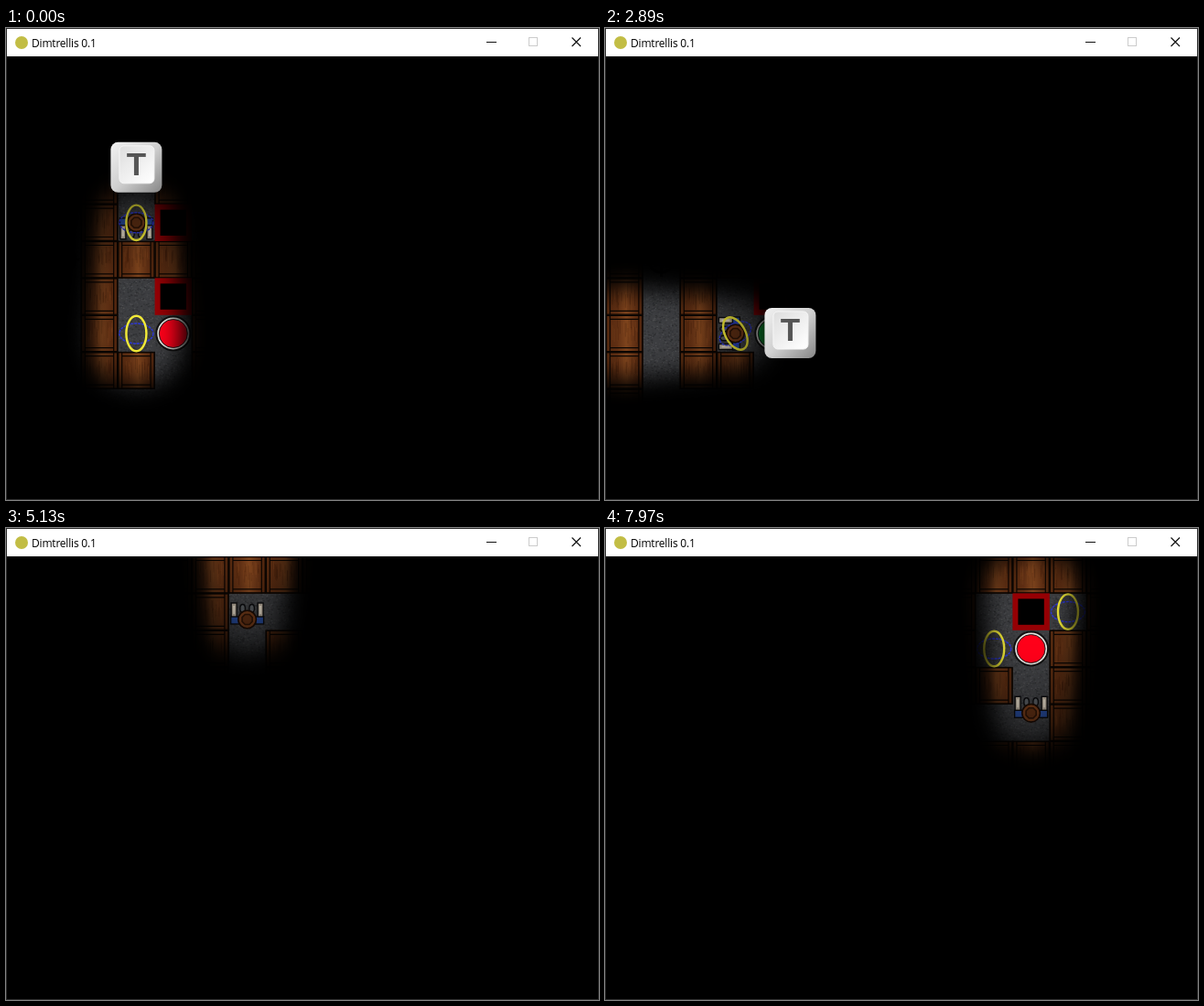
Recreate the animation shown at these times as an HTML page with a canvas. Size 648 px wide and 516 px high, loop 8000 ms.

```html
<!DOCTYPE html>
<html lang="en">
<head>
<meta charset="utf-8">
<title>Dimtrellis 0.1</title>
<style>
  html, body { margin: 0; width: 100%; height: 100%; overflow: hidden; background: #000; }
  #win { position: absolute; left: 0; top: 0; width: 648px; height: 516px; background: #000; }
  #win::after { content: ""; position: absolute; inset: 0; border: 1px solid #2c2c2c; }
  #bar { position: absolute; left: 1px; top: 1px; width: 646px; height: 30px; background: #fff; }
  #icon { position: absolute; left: 9px; top: 8px; width: 14px; height: 14px; border-radius: 50%; background: #c2bd45; }
  #name { position: absolute; left: 27px; top: 0; font: 12px/31px "Open Sans", "Noto Sans", sans-serif; letter-spacing: -.2px; color: #000; white-space: nowrap; }
  #bar svg { position: absolute; left: 0; top: 0; }
  canvas { position: absolute; left: 1px; top: 31px; }
</style>
</head>
<body>
<div id="win">
  <div id="bar">
    <div id="icon"></div>
    <div id="name">Dimtrellis 0.1</div>
    <svg width="646" height="30" fill="none">
      <path d="M524 14.5h11" stroke="#111"/>
      <rect x="570.5" y="9.5" width="9" height="9" stroke="#ccc"/>
      <path d="M617.5 9.5l9.5 9.5m0-9.5l-9.5 9.5" stroke="#111" stroke-width="1.2"/>
    </svg>
  </div>
  <canvas id="game" width="646" height="484"></canvas>
</div>
<script>
const LOOP = 8000, W = 646, H = 484, T = 40.4;
const MAP = [
  '################',
  '#.####...#...###',
  '#.####.#.#..####',
  '#.#.##.#.##.####',
  '#.#....#....####',
  '#.##############',
  '#.#..###..######',
  '#.#..###########',
  '#.##.###########',
  '#....###########',
  '################',
  '################'
];
const mid = n => (n + .5) * T;
const ANGLE = { U: 0, R: Math.PI / 2, D: Math.PI, L: -Math.PI / 2 };

// time, column, row, facing; a repeated time is a jump
const WALK = [
  [0, 3, 4, 'D'], [720, 3, 4, 'D'], [720, 3, 7, 'D'],
  [1160, 3, 7, 'R'], [1470, 4, 7, 'R'],
  [1790, 4, 7, 'L'], [2100, 3, 7, 'L'],
  [2950, 3, 7, 'L'], [2950, 3, 4, 'L'],
  [3635, 3, 4, 'R'], [4405, 6, 4, 'U'],
  [5185, 6, 1, 'U'], [5230, 6, 1, 'R'], [5800, 8, 1, 'R'],
  [6370, 8, 1, 'R'], [6370, 8, 1.22, 'D'], [6980, 8, 4, 'R'],
  [7710, 11, 4, 'R'], [7890, 11, 4, 'U'], [7970, 11, 3.74, 'U'], [8000, 11, 3.74, 'U']
];
const SPINS = [[300, 1070], [2350, 3635]];

let seed = 7;
const rnd = () => (seed = (seed * 16807) % 2147483647) / 2147483647;

function layer(w, h) {
  const c = document.createElement('canvas');
  c.width = w; c.height = h;
  return c.getContext('2d');
}

function ring(g, x, y, rx, ry, color, width, fill) {
  g.beginPath();
  g.ellipse(x, y, rx, ry, 0, 0, 7);
  if (fill) { g.fillStyle = fill; g.fill(); }
  if (width) { g.strokeStyle = color; g.lineWidth = width; g.stroke(); }
}

function box(g, x, y, w, h, color) {
  g.fillStyle = color;
  g.fillRect(x, y, w, h);
}

function drawFloor(g, x, y) {
  box(g, x, y, T + 1, T + 1, '#3c3d40');
  for (let i = 0; i < 420; i++) {
    const v = 34 + rnd() * 56 | 0;
    box(g, x + rnd() * T, y + rnd() * T, 1.6, 1.2, `rgba(${v},${v + 1},${v + 3},.6)`);
  }
}

function drawCrate(g, x, y) {
  const wood = g.createLinearGradient(x, 0, x + T, 0);
  wood.addColorStop(0, '#55290f');
  wood.addColorStop(.3, '#602f13');
  wood.addColorStop(.55, '#7e441d');
  wood.addColorStop(.8, '#602f13');
  wood.addColorStop(1, '#4e240d');
  box(g, x, y, T, T, wood);
  for (let i = 0; i < 26; i++)
    box(g, x + 6 + rnd() * 28, y + 5 + rnd() * 14, 1, 8 + rnd() * 10, `rgba(${rnd() < .5 ? '40,16,4' : '150,85,40'},.2)`);
  g.strokeStyle = '#0a0502';
  g.lineWidth = 1.6;
  g.strokeRect(x + .4, y + .4, T - .8, T - .8);
  g.lineWidth = 1.2;
  g.beginPath();
  for (const e of [4.5, T - 4.5]) {
    g.moveTo(x + e, y); g.lineTo(x + e, y + T);
    g.moveTo(x + 4.5, y + e); g.lineTo(x + T - 4.5, y + e);
  }
  g.stroke();
}

function drawTarget(g, x, y) {
  ring(g, x, y, 14, 14, '#08090a', 3);
  for (let i = 0; i < 4; i++) {
    const c = Math.cos(i * Math.PI / 2), s = Math.sin(i * Math.PI / 2);
    g.beginPath();
    g.moveTo(x + c * 8, y + s * 8);
    g.lineTo(x + c * 19, y + s * 19);
    g.stroke();
  }
  ring(g, x, y, 6, 6, '#4a5490', 1, '#2238c0');
}

function drawDoor(g, col, row, open) {
  const x = col * T, y = row * T;
  box(g, x, y, T, T, open ? '#064d1c' : '#960004');
  if (!open) return box(g, x + 6, y + 6, T - 12, T - 12, '#000');
  box(g, x + 6, y + 6, T - 12, T - 12, '#85888b');
  for (let i = 0; i < 4; i++) {
    box(g, x + 6, y + 10 + i * 7, T - 12, 1.5, '#222');
    box(g, x + 9 + i * 7, y + 6, 1.5, T - 12, '#222');
  }
}

function drawButton(g, col, row, on) {
  const x = mid(col), y = mid(row);
  ring(g, x, y, 18.5, 18.5, '#111', 2, '#e4e4e0');
  ring(g, x, y, 15.5, 15.5, '#222', 1, on ? '#0a9a34' : '#ff0019');
}

function drawPortal(g, col, row, angle) {
  g.save();
  g.translate(mid(col), mid(row));
  g.rotate(angle);
  g.setLineDash([3, 1]);
  ring(g, 0, 0, 18.5, 11, '#2b35d6', 1.4);
  g.setLineDash([]);
  ring(g, 0, 0, 11, 19.2, '#f2ea38', 2.4);
  g.restore();
}

function drawHero(g, x, y, angle) {
  g.save();
  g.translate(x, y);
  g.rotate(angle);
  g.strokeStyle = '#0b0b0d';
  g.lineWidth = 1.4;
  for (const s of [-1, 1]) {
    ring(g, s * 5, -12, 2.8, 4.5, '#0b0b0d', 1.4, '#54585c');
    box(g, s * 14.5 - 3, -18, 6, 17, '#b5aa9a');
    g.strokeRect(s * 14.5 - 3, -18, 6, 17);
    box(g, s * 14.5 - 1, -15, 2, 9, '#e4dac8');
    box(g, s * 13.5 - 4.5, -3, 9, 8, '#274a98');
    g.strokeRect(s * 13.5 - 4.5, -3, 9, 8);
  }
  ring(g, 0, 0, 9.8, 9.8, '#1a0b04', 1.6, '#713a19');
  g.beginPath();
  for (let i = 0; i < 8; i++)
    g.lineTo(6 * Math.cos((i + .5) * Math.PI / 4), 6 * Math.sin((i + .5) * Math.PI / 4));
  g.closePath();
  g.fillStyle = '#5d2e13';
  g.fill();
  g.strokeStyle = '#2c1407';
  g.stroke();
  g.restore();
}

function drawKey(g, x, y) {
  const edge = g.createLinearGradient(x - 28, y - 28, x + 28, y + 28);
  edge.addColorStop(0, '#f2f2f2');
  edge.addColorStop(.5, '#cfcfcf');
  edge.addColorStop(1, '#858585');
  g.fillStyle = edge;
  g.beginPath();
  g.roundRect(x - 28, y - 28, 56, 55, 8);
  g.fill();
  const face = g.createLinearGradient(x - 18, y - 23, x + 18, y + 16);
  face.addColorStop(0, '#dedede');
  face.addColorStop(1, '#fff');
  g.fillStyle = face;
  g.beginPath();
  g.roundRect(x - 18.5, y - 24, 38, 41, 5);
  g.fill();
  g.strokeStyle = '#f6f6f6';
  g.lineWidth = 1;
  g.stroke();
  g.fillStyle = '#555';
  g.font = 'bold 35px "Liberation Sans", Arial, sans-serif';
  g.textAlign = 'center';
  g.fillText('T', x, y + 8);
}

// beam pointing up, lamp holder at (120, 230)
function makeBeam() {
  const g = layer(240, 310);
  g.translate(120, 230);
  const fade = g.createLinearGradient(0, 45, 0, -185);
  fade.addColorStop(0, 'rgba(255,255,255,.5)');
  fade.addColorStop(.2, 'rgba(255,255,255,.75)');
  fade.addColorStop(.45, '#fff');
  fade.addColorStop(.85, '#fff');
  fade.addColorStop(1, 'rgba(255,255,255,.7)');
  g.filter = 'blur(13px)';
  g.fillStyle = fade;
  g.beginPath();
  g.moveTo(-38, 0);
  g.bezierCurveTo(-37, 24, -24, 36, 0, 36);
  g.bezierCurveTo(24, 36, 37, 24, 38, 0);
  g.lineTo(49, -118);
  g.bezierCurveTo(51, -156, 32, -180, 0, -180);
  g.bezierCurveTo(-32, -180, -51, -156, -49, -118);
  g.closePath();
  g.fill();
  return g.canvas;
}

function makeGround() {
  const g = layer(W, H);
  MAP.forEach((line, r) => [...line].forEach((ch, c) => ch === '.' && drawFloor(g, c * T, r * T)));
  MAP.forEach((line, r) => [...line].forEach((ch, c) => ch === '#' && drawCrate(g, c * T, r * T)));
  drawTarget(g, mid(1), mid(5));
  return g.canvas;
}

function heroAt(t) {
  let i = 0;
  while (i < WALK.length - 2 && WALK[i + 1][0] <= t) i++;
  const [t0, c0, r0, face] = WALK[i], [t1, c1, r1] = WALK[i + 1];
  const k = (t - t0) / (t1 - t0);
  return { x: mid(c0 + (c1 - c0) * k), y: mid(r0 + (r1 - r0) * k), angle: ANGLE[face] };
}

function spinAt(t) {
  const s = SPINS.find(([a, b]) => t >= a && t < b);
  return s ? (t - s[0]) / (s[1] - s[0]) * Math.PI * 2 : 0;
}

const screen = document.getElementById('game').getContext('2d');
const world = layer(W, H), ground = makeGround(), beam = makeBeam();

function draw(t) {
  const hero = heroAt(t), pressed = t >= 1440, spin = spinAt(t), g = world;
  g.globalCompositeOperation = 'source-over';
  g.drawImage(ground, 0, 0);
  drawDoor(g, 4, 4, pressed);
  drawDoor(g, 4, 6, false);
  drawDoor(g, 11, 1, false);
  drawButton(g, 4, 7, pressed);
  drawButton(g, 11, 2, false);
  drawHero(g, hero.x, hero.y, hero.angle);
  drawPortal(g, 3, 4, spin);
  drawPortal(g, 3, 7, spin);
  drawPortal(g, 10, 2, 0);
  drawPortal(g, 12, 1, 0);
  g.globalCompositeOperation = 'destination-in';
  g.save();
  g.translate(hero.x, hero.y);
  g.rotate(hero.angle);
  g.drawImage(beam, -120, -230);
  g.restore();

  box(screen, 0, 0, W, H, '#000');
  screen.drawImage(world.canvas, 0, 0);
  if (Math.abs(hero.x - mid(3)) < 12)
    drawKey(screen, hero.x - 60 * Math.sin(hero.angle), hero.y + 60 * Math.cos(hero.angle));
}

const start = performance.now();
function tick() {
  draw((performance.now() - start) % LOOP);
  requestAnimationFrame(tick);
}
tick();
</script>
</body>
</html>
```
